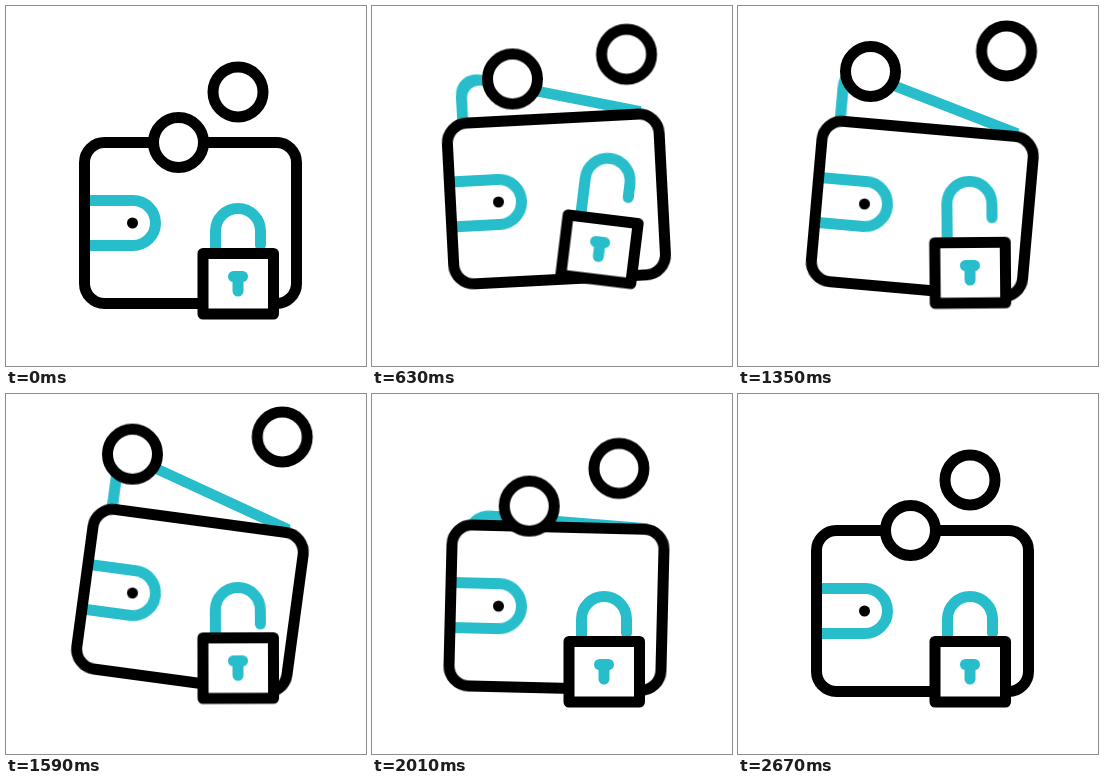
Write an HTML page without scripts that moves like this. It is 360 by 360 pixels and loops after 2.7 s.

```html
<!DOCTYPE html>
<html lang="en">
<head>
<meta charset="utf-8">
<title>Wallet and lock</title>
<style>
html, body { margin: 0; width: 100%; height: 100%; overflow: hidden; background: #fff; }
svg { display: block; width: 100vw; height: 100vh; }

.line { fill: none; stroke: #000; stroke-width: 11; }
.solid { fill: #fff; }
.teal { stroke: #27bdcb; }

.wallet, .flap, .coin-low, .coin-high, .lock, .shackle {
  animation: 2.7s linear infinite;
}
.wallet { animation-name: wallet; transform-origin: 126.5px 217px; }
.flap { animation-name: flap; transform-origin: 283px 136.5px; }
.coin-low { animation-name: coin-low; }
.coin-high { animation-name: coin-high; }
.lock { animation-name: lock; transform-origin: 232.25px 277.5px; }
.shackle { animation-name: shackle; }

/* Pop open, drift slowly, swing back past rest, settle. */
@keyframes wallet {
  0% { transform: translateY(0) rotate(0deg); animation-timing-function: cubic-bezier(.37, 0, .63, 1); }
  15.56% { transform: translateY(-21.5px) rotate(-5.3deg); }
  23.33% { transform: translateY(-21px) rotate(-3deg); }
  36.67% { transform: translateY(-20px) rotate(1deg); }
  50% { transform: translateY(-19px) rotate(5deg); }
  63.33% { transform: translateY(-17.5px) rotate(9deg); animation-timing-function: cubic-bezier(.37, 0, .63, 1); }
  82.2% { transform: translateY(2.2px) rotate(-2.8deg); animation-timing-function: cubic-bezier(.37, 0, .63, 1); }
  98.9%, 100% { transform: translateY(0) rotate(0deg); }
}
@keyframes flap {
  0% { transform: skewY(0deg); animation-timing-function: cubic-bezier(.37, 0, .63, 1); }
  15.56% { transform: skewY(13.6deg); }
  23.33% { transform: skewY(14.1deg); }
  36.67% { transform: skewY(15.3deg); }
  50% { transform: skewY(16.2deg); }
  63.33% { transform: skewY(17.5deg); animation-timing-function: cubic-bezier(.37, 0, .63, 1); }
  78.9%, 100% { transform: skewY(0deg); }
}
@keyframes coin-low {
  0% { transform: translate(0, 0); animation-timing-function: cubic-bezier(.37, 0, .63, 1); }
  15.56% { transform: translate(-30px, -61.5px); }
  23.33% { transform: translate(-32px, -63.5px); }
  36.67% { transform: translate(-36px, -67px); }
  50% { transform: translate(-40px, -71px); }
  63.33% { transform: translate(-49px, -79px); animation-timing-function: cubic-bezier(.37, 0, .63, 1); }
  82.2% { transform: translate(3.5px, 6px); animation-timing-function: cubic-bezier(.37, 0, .63, 1); }
  98.9%, 100% { transform: translate(0, 0); }
}
@keyframes coin-high {
  0% { transform: translate(0, 0); animation-timing-function: cubic-bezier(.37, 0, .63, 1); }
  15.56% { transform: translate(18px, -36.5px); }
  23.33% { transform: translate(22.5px, -37.7px); }
  36.67% { transform: translate(29px, -39px); }
  50% { transform: translate(36.5px, -41px); }
  63.33% { transform: translate(48px, -44px); animation-timing-function: cubic-bezier(.37, 0, .63, 1); }
  82.2% { transform: translate(-3.5px, 6.5px); animation-timing-function: cubic-bezier(.37, 0, .63, 1); }
  98.9%, 100% { transform: translate(0, 0); }
}
@keyframes lock {
  0% { transform: translate(0, 0) rotate(0deg); animation-timing-function: cubic-bezier(.37, 0, .63, 1); }
  15.56% { transform: translate(-7px, -41px) rotate(10deg); }
  23.33% { transform: translate(-4.75px, -34.5px) rotate(7deg); }
  36.67% { transform: translate(-1.25px, -22px) rotate(1.3deg); }
  50% { transform: translate(0, -11px) rotate(-.5deg); }
  63.33%, 100% { transform: translate(0, 0) rotate(0deg); }
}
@keyframes shackle {
  0% { transform: translateY(0); animation-timing-function: cubic-bezier(.37, 0, .63, 1); }
  15.56%, 50% { transform: translateY(-16.2px); }
  63.33%, 100% { transform: translateY(0); }
}
</style>
</head>
<body>
<svg viewBox="0 0 360 360">
  <g class="wallet">
    <path class="line teal flap" d="M95 225V158.500A22 22 0 0 1 117 136.500H274"/>
    <rect class="solid" x="78.500" y="136.500" width="212" height="161" rx="20"/>
    <path class="line teal" d="M79 194.500H127a22.500 22.500 0 0 1 0 45H79"/>
    <circle cx="126.500" cy="217" r="5.500"/>
    <rect class="line" x="78.500" y="136.500" width="212" height="161" rx="20"/>
  </g>

  <circle class="line solid coin-low" cx="172.500" cy="136.500" r="25"/>
  <circle class="line solid coin-high" cx="232" cy="86" r="25"/>

  <g class="lock" stroke-linecap="round" stroke-linejoin="round">
    <path class="line teal shackle" d="M209.500 265V225a22.500 22.500 0 0 1 45 0V239"/>
    <rect class="line solid" x="197" y="247.500" width="70.500" height="60.500"/>
    <path class="line teal" d="M227.500 270.500H236.500M232 270.500V285"/>
  </g>
</svg>
</body>
</html>
```
